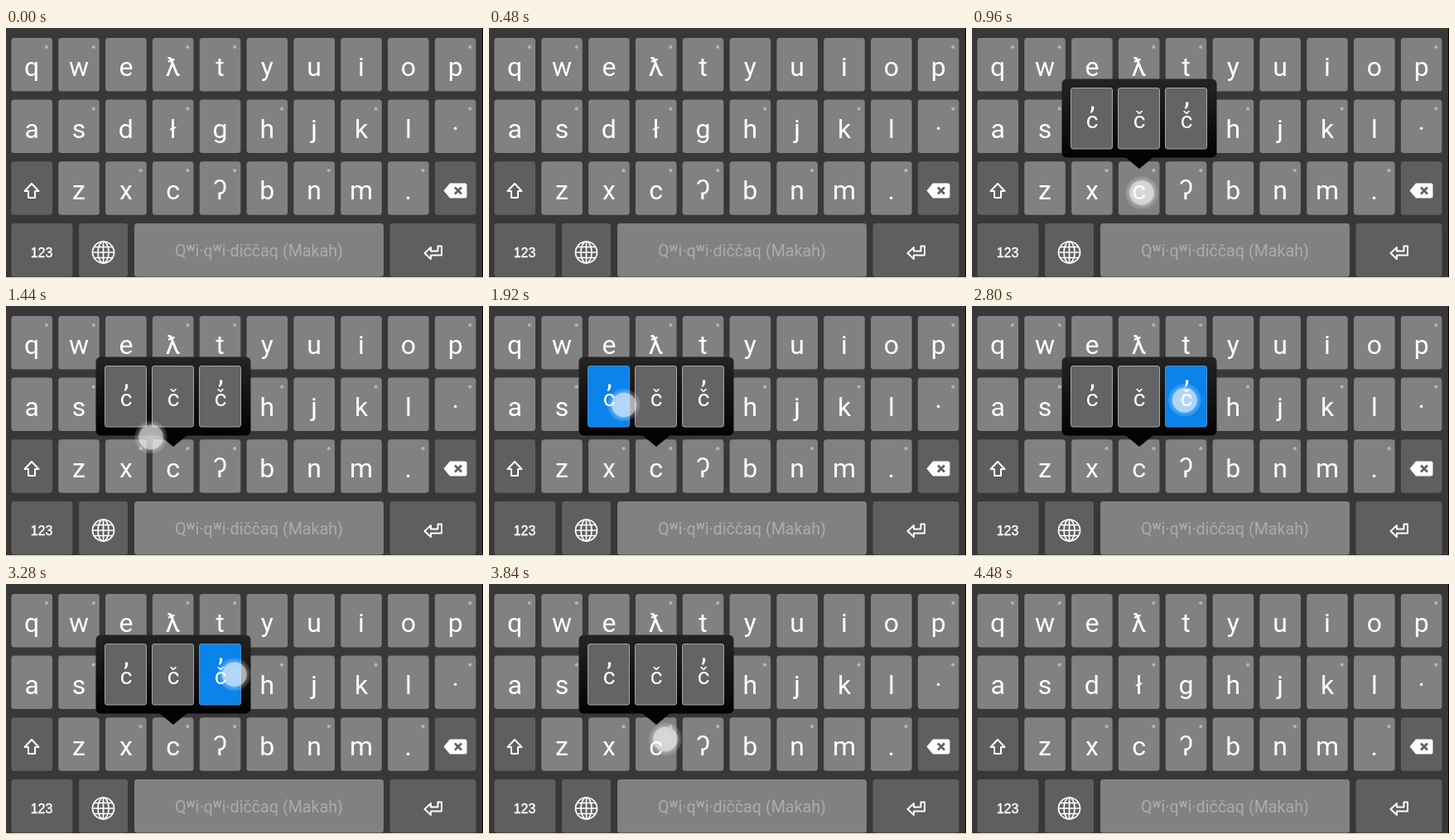
Animation of 576 by 302 pixels, one loop 5.36 s. Source, as an HTML page:

```html
<!DOCTYPE html>
<html lang="en">
<head>
<meta charset="utf-8">
<title>Keyboard long press</title>
<style>
  html, body { margin: 0; width: 100%; height: 100%; overflow: hidden; background: #383838; }
  svg { display: block; width: 576px; height: 302px; }
  text { font-family: Roboto, "Noto Sans", "DejaVu Sans", sans-serif; fill: #fff; text-anchor: middle; }
  .key { fill: #818181; }
  .special { fill: #5f5f5f; }
  .letter { font-size: 32px; }
  .hint { fill: #b4b4b4; }
  .name { font-size: 19.7px; fill: #acacac; }
  .mode { font: 16px "Liberation Sans", sans-serif; stroke: #fff; stroke-width: .4px; }
  .line { fill: none; stroke: #fff; stroke-width: 2; stroke-linejoin: round; }
  .option { fill: #646464; stroke: #a6a6a6; }
  .option.on { fill: #0a84ea; stroke: #4c8fc8; }
  .small { font-size: 28px; }
</style>
</head>
<body>
<svg viewBox="0 0 576 302">
  <defs>
    <linearGradient id="panel" x1="0" y1="0" x2="0" y2="1">
      <stop offset="0" stop-color="#242424"/>
      <stop offset="1" stop-color="#020202"/>
    </linearGradient>
    <radialGradient id="glow">
      <stop offset="0" stop-color="#fff" stop-opacity=".7"/>
      <stop offset=".7" stop-color="#fff" stop-opacity=".66"/>
      <stop offset=".8" stop-color="#dbe6f0" stop-opacity=".3"/>
      <stop offset="1" stop-color="#fff" stop-opacity=".08"/>
    </radialGradient>
  </defs>
  <path fill="#000" d="M575 0h1v302h-1z"/>
  <path fill="#e4e4e4" d="M0 301h576v1H0z"/>
  <g id="board"></g>
  <g id="icons">
    <path class="line" d="M31 188L39.500 197H35V205H27V197H22.500Z"/>
    <path fill="#fff" d="M528.500 196.500L536 187.500H554Q556.500 187.500 556.500 190V203Q556.500 205.500 554 205.500H536Z"/>
    <path fill="none" stroke="#5f5f5f" stroke-width="2.600" d="M542 192.500l8 8m0-8l-8 8"/>
    <g class="line" style="stroke-width:1.7">
      <circle cx="117.500" cy="271" r="13"/>
      <ellipse cx="117.500" cy="271" rx="6.500" ry="13"/>
      <path d="M117.500 258v26M104.500 271h26M106.500 264.500h22M106.500 277.500h22"/>
    </g>
    <path class="line" d="M521.500 263.500H526V274.500H513V279L505.500 272L513 265V269.500H521.500Z"/>
  </g>
  <g id="popup">
    <rect fill="url(#panel)" x="108.500" y="61.500" width="187" height="95" rx="6"/>
    <path fill="#020202" d="M185 156H219L202 170Z"/>
  </g>
  <circle id="touch" r="20" fill="url(#glow)"/>
</svg>
<script>
const $ = id => document.getElementById(id);
const LOOP = 5360, STEP = 80, SHOW = 880, OPEN = 960, END = 4240;
const board = $("board"), popup = $("popup"), touch = $("touch");

function add(parent, tag, attrs, label) {
  const el = document.createElementNS("http://www.w3.org/2000/svg", tag);
  for (const name in attrs) el.setAttribute(name, attrs[name]);
  if (label) el.textContent = label;
  parent.append(el);
  return el;
}

function addKey(x, y, width, type = "key") {
  add(board, "rect", { class: type, x, y, width, height: 64.5, rx: 3.5 });
}

// "<" and "#" stand for the shift and backspace keys
const rows = ["qweƛtyuiop", "asdłghjkl·", "<zxcʔbnm.#"];
const hinted = "qwƛtpsłhk·xcʔn.";

rows.forEach((row, r) => [...row].forEach((char, c) => {
  const x = 6.4 + c * 56.83, y = 12 + r * 74.6;
  const special = "<#".includes(char);
  addKey(x, y, 49.6, special ? "special" : "key");
  if (special) return;
  add(board, "text", { class: "letter", x: x + 24.8, y: y + 46 }, char);
  if (hinted.includes(char)) {
    add(board, "circle", { class: "hint", cx: x + 42.5, cy: y + 11, r: 2.1 });
  }
}));

addKey(6.4, 236, 74, "special");
addKey(88, 236, 59, "special");
addKey(155, 236, 301);
addKey(463.5, 236, 104, "special");
add(board, "text", { class: "mode", x: 43, y: 277 }, "123");
add(board, "text", { class: "name", x: 305.5, y: 276 }, "Qʷi·qʷi·diččaq (Makah)");

// Comma mark above a letter
function addMark(x, y) {
  add(popup, "path", { fill: "#fff", d: `M${x - 1} ${y}h3.2v3q0 3 -3 5.5l-1.5 -1q1.300 -2 1.300 -4z` });
}

const options = ["c", "č", "č"].map((char, i) => {
  const x = 119.5 + i * 57;
  const box = add(popup, "rect", { class: "option", x, y: 72.5, width: 50, height: 73.5, rx: 2.5 });
  add(popup, "text", { class: "small", x: x + 25.5, y: 120.5 }, char);
  return box;
});
addMark(145, 94.5);
addMark(259, 89.5);

// The finger rests at each stop and glides between them
const home = { x: 205, y: 199 };
const moves = [
  { from: 1200, to: 1680, x: 145, y: 118 },
  { from: 1760, to: 2160, x: 215, y: 124 },
  { from: 2480, to: 3040, x: 276, y: 109 },
  { from: 3200, to: 4160, x: 202, y: 201 }
];

const ease = k => k < 0.5 ? 4 * k ** 3 : 1 - 4 * (1 - k) ** 3;

function fingerAt(t) {
  let { x, y } = home;
  for (const move of moves) {
    const k = ease(Math.min(1, Math.max(0, (t - move.from) / (move.to - move.from))));
    x += (move.x - x) * k;
    y += (move.y - y) * k;
  }
  return { x, y };
}

function draw(time) {
  const t = Math.floor((time % LOOP) / STEP) * STEP;
  const down = t >= SHOW && t < END;
  touch.style.display = down ? "" : "none";
  popup.style.display = down && t >= OPEN ? "" : "none";
  const { x, y } = fingerAt(t);
  touch.setAttribute("cx", x);
  touch.setAttribute("cy", y);
  const chosen = y > 148 ? -1 : Math.floor((x - 116) / 57);
  options.forEach((box, i) => box.classList.toggle("on", i === chosen));
}

const start = performance.now();
function tick() {
  draw(performance.now() - start);
  requestAnimationFrame(tick);
}
tick();
</script>
</body>
</html>
```
